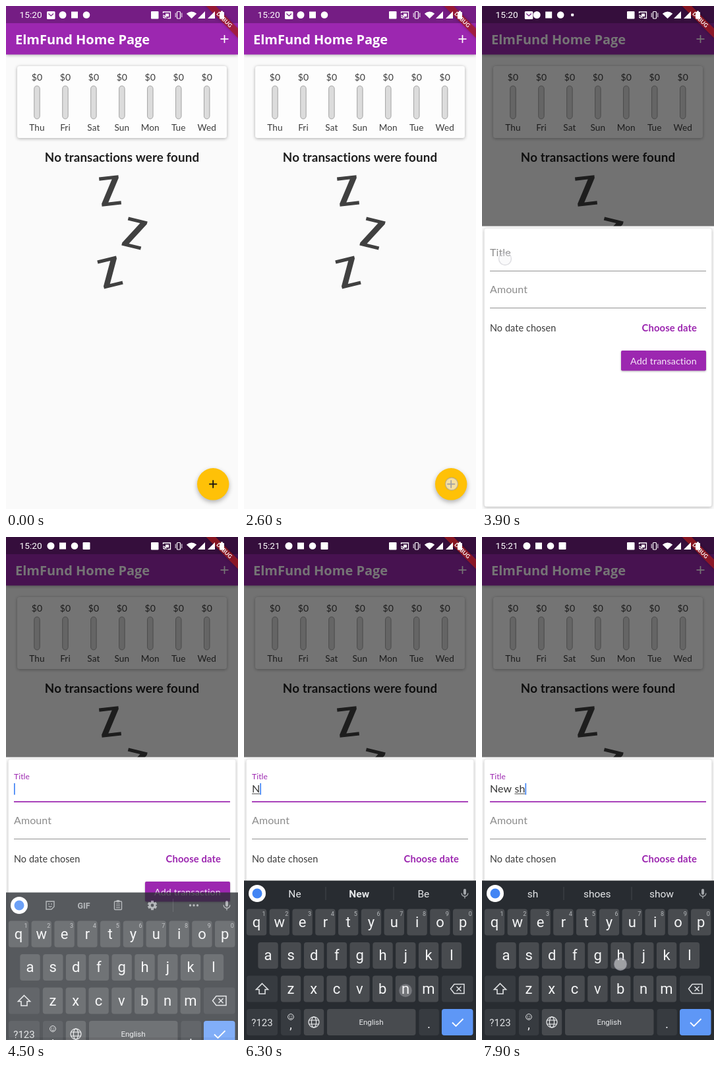
Recreate the animation shown at these times as an HTML page with a canvas. Size 352 px wide and 762 px high, loop 8000 ms.

```html
<!DOCTYPE html>
<html lang="en">
<head>
<meta charset="utf-8">
<title>Expense app</title>
<style>
  html, body { margin: 0; width: 100%; height: 100%; overflow: hidden; background: #fafafa; }
  canvas { display: block; }
</style>
</head>
<body>
<canvas id="stage" width="352" height="762"></canvas>
<script>
const W = 352, H = 762, LOOP = 8000, TAU = Math.PI * 2;
const PURPLE = '#9c27b0', KEY = '#484b4f', KEY_DARK = '#373b40', BOARD = '#282c31', INK = '#3c3c3c';
const screen = document.getElementById('stage').getContext('2d');
const layerCanvas = Object.assign(document.createElement('canvas'), { width: W, height: H });
const layer = layerCanvas.getContext('2d');
let c = screen;

const clamp = v => Math.max(0, Math.min(1, v));
const progress = (t, from, to) => clamp((t - from) / (to - from));
const easeOut = p => 1 - (1 - p) ** 2;
const mix = (a, b, p) => a + (b - a) * p;

// Touches: press time, position and, for typing, the text after release.
const touches = [
  { at: 2600, x: 315, y: 724 },
  { at: 3690, x: 35, y: 383 },
  { at: 5700, x: 28, y: 686 },
  { at: 6050, x: 245, y: 687, key: 'n', text: 'N' },
  { at: 6550, x: 91, y: 590, key: 'e', text: 'Ne' },
  { at: 6750, x: 61, y: 588, key: 'w', text: 'New' },
  { at: 7050, x: 190, y: 737, text: 'New ' },
  { at: 7450, x: 72, y: 638, key: 's', text: 'New s' },
  { at: 7750, x: 210, y: 647, key: 'h', text: 'New sh' }
];
const RELEASE = 85;

const letters = [
  { row: 'qwertyuiop', x: 19, y: 583.5 },
  { row: 'asdfghjkl', x: 36.5, y: 634 },
  { row: 'zxcvbnm', x: 71, y: 684.5 }
];
const PITCH = 34.8;

function box(x, y, w, h, r, fill) {
  c.beginPath();
  c.roundRect(x, y, w, h, r);
  c.fillStyle = fill;
  c.fill();
}
function disc(x, y, r, fill) {
  c.beginPath();
  c.arc(x, y, r, 0, TAU);
  c.fillStyle = fill;
  c.fill();
}
function line(points, color, width = 1, close = false) {
  c.beginPath();
  points.forEach(p => c.lineTo(...p));
  if (close) c.closePath();
  c.strokeStyle = color;
  c.lineWidth = width;
  c.stroke();
}
function shape(points, fill) {
  c.beginPath();
  points.forEach(p => c.lineTo(...p));
  c.fillStyle = fill;
  c.fill();
}
function outline(x, y, w, h, r, color, width = 1) {
  c.beginPath();
  c.roundRect(x, y, w, h, r);
  c.strokeStyle = color;
  c.lineWidth = width;
  c.stroke();
}
function ring(x, y, r, color, width = 1) {
  c.beginPath();
  c.arc(x, y, r, 0, TAU);
  c.strokeStyle = color;
  c.lineWidth = width;
  c.stroke();
}
function label(str, x, y, size, color, align = 'left', weight = 400, family = 'Lato') {
  c.font = `${weight} ${size}px "${family}", sans-serif`;
  // Slight tracking also keeps Lato from forming ligatures.
  c.letterSpacing = family === 'Lato' ? '0.1px' : '0px';
  c.textAlign = align;
  c.fillStyle = color;
  c.fillText(str, x, y);
}
const roboto = (str, x, y, size, color = '#f4f5f6', weight = 400, align = 'center') =>
  label(str, x, y, size, color, align, weight, 'Roboto');
function shadowed(blur, dy, alpha, draw) {
  c.save();
  c.shadowColor = `rgba(0,0,0,${alpha})`;
  c.shadowBlur = blur;
  c.shadowOffsetY = dy;
  draw();
  c.restore();
}
function plus(x, y, r, color, width) {
  line([[x - r, y], [x + r, y]], color, width);
  line([[x, y - r], [x, y + r]], color, width);
}

function zed(x, y, degrees) {
  c.save();
  c.translate(x, y);
  c.rotate(degrees * Math.PI / 180);
  shape([[-14.8, -22.2], [14.8, -22.2], [14.8, -18], [-4.5, 17], [14.8, 17],
    [14.8, 22.2], [-14.8, 22.2], [-14.8, 18], [4.5, -17], [-14.8, -17]], '#404040');
  c.restore();
}

function homePage() {
  c.fillStyle = '#fafafa';
  c.fillRect(0, 0, W, H);
  shadowed(5, 1.5, .3, () => box(0, 0, W, 73.5, 0, PURPLE));
  label('ElmFund Home Page', 14, 58, 20, '#fff', 'left', 700, 'Open Sans');
  plus(331.5, 50, 6, '#fff', 1.7);

  shadowed(5, 1, .32, () => box(17, 91, 318, 109, 3.5, '#fdfdfd'));
  ['Thu', 'Fri', 'Sat', 'Sun', 'Mon', 'Tue', 'Wed'].forEach((day, i) => {
    const x = 47 + 42.95 * i;
    label('$0', x, 113, 14, INK, 'center');
    box(x - 4.5, 121, 9, 50, 4.5, '#dcdcdc');
    outline(x - 4.2, 121, 8.4, 50, 4.2, '#9e9e9e', .9);
    label(day, x, 188.5, 13.6, INK, 'center');
  });

  label('No transactions were found', 176, 235.5, 18.8, '#1e1e1e', 'center', 700);
  zed(158, 280, -6);
  zed(195, 344.5, 14);
  zed(158, 403.5, -14);

  shadowed(7, 3, .3, () => disc(314.2, 724.3, 24.2, '#ffc107'));
  plus(314.2, 724.3, 6, '#111', 1.8);
}

function entrySheet(t, text, caretOn) {
  const p = easeOut(progress(t, 2720, 3020));
  if (!p) return;
  c.fillStyle = `rgba(0,0,0,${.54 * p})`;
  c.fillRect(0, 0, W, H);
  c.save();
  c.translate(0, (1 - p) * 429);
  box(0, 333.5, W, 429, 0, '#fafafa');
  shadowed(4, 1, .3, () => box(3.5, 337, 345, 421.5, 3.5, '#fff'));

  const f = easeOut(progress(t, 4000, 4180));
  const focused = f > 0;
  label('Title', 12, mix(379, 367, f), mix(16, 12, f), focused ? PURPLE : '#8c8c8c');
  box(12, focused ? 400.3 : 401, 328, focused ? 1.8 : 1, 0, focused ? PURPLE : '#929292');
  if (focused) {
    label(text, 12, 387, 16, '#333');
    const end = 12 + c.measureText(text).width;
    const word = text.split(' ').pop();
    const start = end - c.measureText(word).width;
    if (word) box(start, 388.5, end - start, 1, 0, '#444');
    if (caretOn) box(end, 373, 1.7, 17.5, 0, '#4285f4');
  }
  label('Amount', 12, 435, 16, '#8c8c8c');
  box(12, 457, 328, 1, 0, '#929292');
  label('No date chosen', 12, 492.5, 14.4, INK);
  label('Choose date', 326, 492.5, 14.8, PURPLE, 'right', 700);
  shadowed(3, 1, .3, () => box(211, 522, 129, 30.5, 2, PURPLE));
  label('Add transaction', 275.5, 543, 14.3, '#f6e9f8', 'center');
  c.restore();
}

function toolbar(text) {
  const ink = '#a2a6aa';
  disc(20, 540, 13, '#fff');
  disc(20, 540, 7.5, '#4285f4');

  box(333, 533, 4, 9, 2, ink);
  c.beginPath();
  c.arc(335, 539.5, 4.8, 0, Math.PI);
  c.strokeStyle = ink;
  c.lineWidth = 1.4;
  c.stroke();
  line([[335, 544], [335, 547.5]], ink, 1.4);

  if (text) {
    const shopping = text.length > 4;
    const words = shopping ? ['sh', 'shoes', 'show'] : ['Ne', 'New', 'Be'];
    words.forEach((word, i) =>
      roboto(word, 77 + 97.7 * i, 545.5, 15.5, '#e4e6e8', i === 1 && !shopping ? 700 : 400));
    [123.5, 226.5].forEach(x => box(x, 530, 1, 20, 0, '#43474c'));
    return;
  }
  line([[61, 534], [73, 534], [73, 542], [69, 546], [61, 546]], ink, 1.4, true);
  [65, 69].forEach(x => disc(x, 538, .9, ink));
  line([[64.5, 541], [67, 542.5], [69.5, 541]], ink, 1.2);
  roboto('GIF', 118, 544.5, 12.5, ink, 700);
  outline(164.5, 534, 11, 12.5, 1, ink, 1.4);
  box(167.5, 532, 5, 3.5, 1, ink);
  [538, 540.8, 543.6].forEach(y => line([[167, y], [173, y]], ink, 1));
  for (let i = 0; i < 6; i++) {
    const a = i * TAU / 6 + TAU / 12;
    line([[222, 540], [222 + 7.2 * Math.cos(a), 540 + 7.2 * Math.sin(a)]], ink, 4);
  }
  disc(222, 540, 5.4, ink);
  disc(222, 540, 2.4, BOARD);
  box(253, 530, 1, 20, 0, '#43474c');
  [279.5, 285, 290.5].forEach(x => disc(x, 540, 1.7, ink));
}

function letterKeys(upper) {
  letters.forEach(({ row, x, y }, r) => [...row].forEach((ch, i) => {
    const cx = x + PITCH * i;
    box(cx - 15.2, y - 20, 30.4, 40, 4, KEY);
    roboto(upper ? ch.toUpperCase() : ch, cx, y + 7, 22);
    if (r === 0) roboto((i + 1) % 10, cx + 11, y - 9.5, 9, '#b5b8bb');
  }));
}

function specialKeys(shifted) {
  const ink = '#dfe1e3';
  box(4, 664.5, 47, 40, 4, KEY_DARK);
  const arrow = [[27.5, 676.5], [36.5, 685.5], [32, 685.5], [32, 692], [23, 692], [23, 685.5], [18.5, 685.5]];
  if (shifted) shape(arrow, ink);
  line(arrow, ink, 1.6, true);

  box(300, 664.5, 47.5, 40, 4, KEY_DARK);
  line([[313.5, 684.5], [319, 677.5], [334, 677.5], [334, 691.5], [319, 691.5]], ink, 1.5, true);
  line([[322.5, 681], [329.5, 688]], ink, 1.5);
  line([[329.5, 681], [322.5, 688]], ink, 1.5);

  box(4, 715, 47, 40, 4, KEY_DARK);
  roboto('?123', 27.5, 740.5, 15, ink);

  box(56, 715, 30.4, 40, 4, KEY_DARK);
  ring(71, 727, 4.4, ink, 1);
  [69.4, 72.6].forEach(x => disc(x, 726, .7, ink));
  c.beginPath();
  c.arc(71, 727.5, 2.2, .2, Math.PI - .2);
  c.lineWidth = .9;
  c.stroke();
  roboto(',', 71, 745, 18);

  box(90.8, 715, 30.4, 40, 4, KEY);
  ring(106, 735, 8, ink, 1.3);
  c.beginPath();
  c.ellipse(106, 735, 3.6, 8, 0, 0, TAU);
  c.stroke();
  [732, 738].forEach(y => line([[98.6, y], [113.4, y]], ink, 1.2));

  box(126, 715, 134.5, 40, 4, KEY);
  roboto('English', 193, 739, 11.5, '#e8eaec');
  box(265.5, 715, 30.4, 40, 4, KEY_DARK);
  roboto('.', 280.5, 744, 19);
  box(300, 715, 47.5, 40, 4, '#5e97f6');
  line([[316, 735.5], [321.5, 741], [332.5, 730]], '#fff', 1.8);
}

function keyPopup(key, upper) {
  const found = letters.find(({ row }) => row.includes(key));
  const x = found.x + PITCH * found.row.indexOf(key);
  box(x - 17.5, found.y - 80.5, 35, 101, 4, '#212429');
  roboto(upper ? key.toUpperCase() : key, x, found.y - 47.5, 24);
  [-1, 0, 1].forEach(i => disc(x + 10 + 3 * i, found.y - 38, .7, '#e0e0e0'));
}

function keyboard(t, text) {
  const p = easeOut(progress(t, 4250, 4750));
  if (!p) return;
  const upper = t >= 5700 + RELEASE && t < 6050 + RELEASE;
  c = layer;
  c.clearRect(0, 0, W, H);
  box(0, 520.5, W, 242, 0, BOARD);
  toolbar(text);
  letterKeys(upper);
  specialKeys(upper);
  const pressed = touches.find(k => k.key && t >= k.at && t < k.at + RELEASE);
  if (pressed) keyPopup(pressed.key, upper);
  c = screen;
  c.globalAlpha = mix(.1, 1, p);
  c.drawImage(layerCanvas, 0, 72 * (1 - p));
  c.globalAlpha = 1;
}

function debugBanner() {
  c.save();
  c.translate(W, 0);
  c.rotate(Math.PI / 4);
  shadowed(4, 0, .4, () => box(-40, 24, 80, 10.3, 0, 'rgba(183,28,28,.66)'));
  label('DEBUG', 0, 32.2, 8.4, '#fff', 'center', 700);
  c.restore();
}

function notices(t) {
  const p = progress(t, 3800, 4200);
  const slide = 18 * p * p * (3 - 2 * p);
  c.save();
  c.globalAlpha = 1 - progress(t, 3900, 4050);
  box(62 + slide, 8, 12.5, 12, 1.5, '#fff');
  line([[64.5 + slide, 11.5], [68.3 + slide, 15], [72 + slide, 11.5]], '#751d84', 1.2);
  c.restore();
  disc(86 - slide, 13.5, 5.5, '#fff');
  box(99 - slide, 8.5, 10, 10, 0, '#fff');
  disc(122 - slide, 13.5, 5.3, '#fff');
  const grow = 5.5 * clamp(p * 1.5);
  if (p) box(140 - slide - grow, 13.5 - grow, 2 * grow, 2 * grow, 1, '#fff');
}

function statusBar(t) {
  roboto(t < 6000 ? '15:20' : '15:21', 20.5, 18.3, 13.7, '#fff', 400, 'left');
  notices(t);

  box(220, 8, 11.5, 11.5, 1, '#fff');
  line([[238.5, 11], [238.5, 9], [249.5, 9], [249.5, 18.5], [245, 18.5]], '#fff', 1.3);
  [2.5, 5].forEach(r => {
    c.beginPath();
    c.arc(238, 19, r, -Math.PI / 2, 0);
    c.stroke();
  });
  box(242, 11.5, 5, 4.5, 0, '#fff');
  outline(259.5, 8.5, 5, 10.5, 1, '#fff', 1.2);
  [257.2, 266.8].forEach(x => line([[x, 10.5], [x, 17]], '#fff', 1));

  c.beginPath();
  c.moveTo(281.5, 19);
  c.arc(281.5, 19, 10.5, -Math.PI * .76, -Math.PI * .24);
  c.fillStyle = '#fff';
  c.fill();
  [302, 317].forEach(x => shape([[x, 8], [x, 19], [x - 11, 19]], '#fff'));
  box(324, 9, 7, 10.5, 1, '#fff');
  box(326, 7.5, 3, 2, 0, '#fff');
}

function touchDots(t) {
  touches.forEach(({ at, x, y }) => {
    const age = t - at;
    if (age < 0 || age > 350) return;
    c.save();
    c.globalAlpha = 1 - progress(age, 100, 350);
    disc(x, y, 9.5, 'rgba(240,240,244,.65)');
    ring(x, y, 9.5, 'rgba(150,150,165,.55)', 1.4);
    c.restore();
  });
}

function render(t) {
  const typed = touches.filter(k => k.text && t >= k.at + RELEASE).pop();
  const text = typed ? typed.text : '';
  const blinkStart = typed ? typed.at + RELEASE : 4400;
  c = screen;
  homePage();
  entrySheet(t, text, (t - blinkStart) % 1000 < 500);
  box(0, 0, W, 26, 0, 'rgba(0,0,0,.25)');
  debugBanner();
  statusBar(t);
  keyboard(t, text);
  touchDots(t);
}

let origin;
function tick(now) {
  origin ??= now;
  render((now - origin) % LOOP);
  requestAnimationFrame(tick);
}
render(0);
requestAnimationFrame(tick);
</script>
</body>
</html>
```
